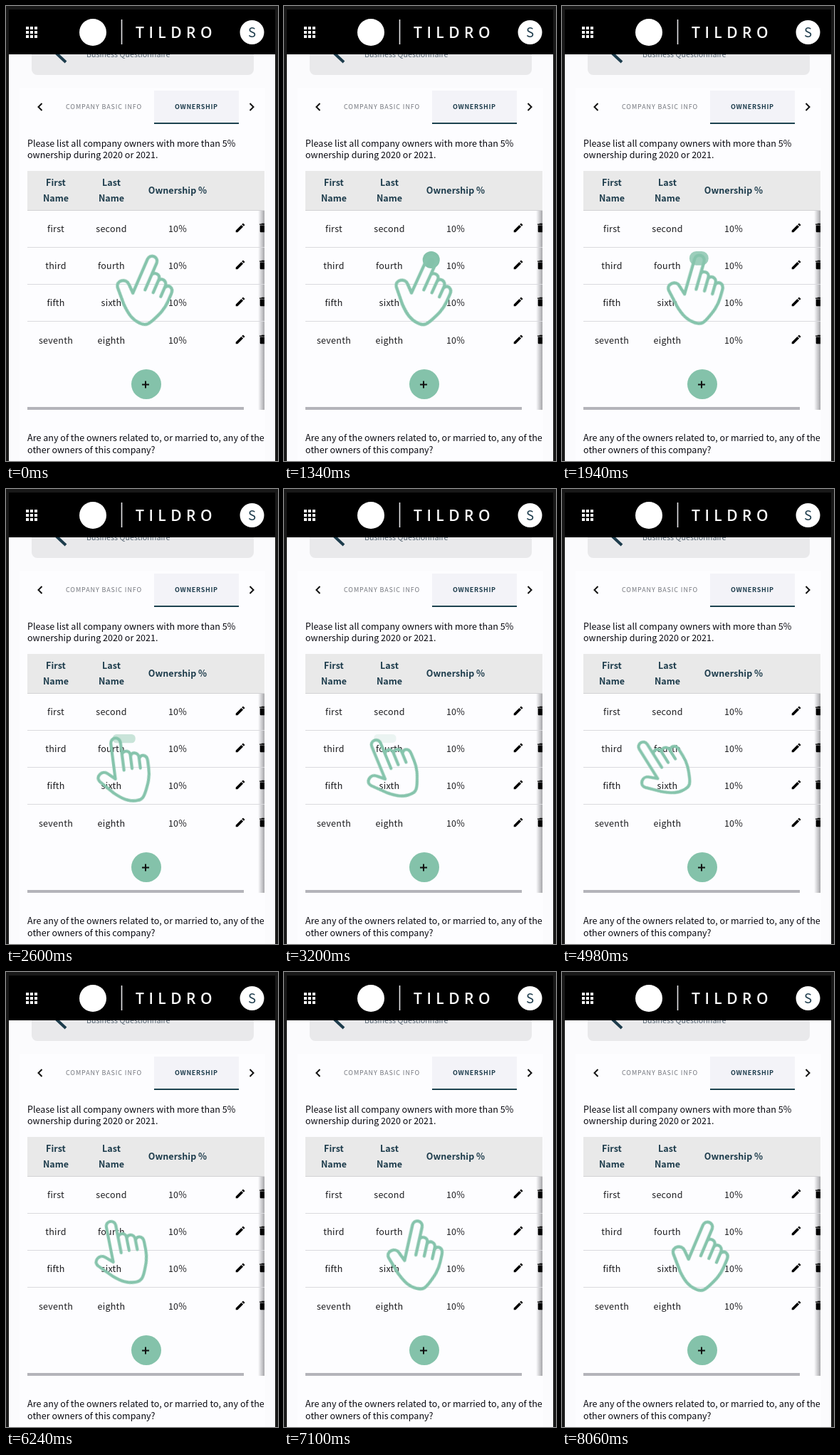
These frames come from a looping animation (382x640 px, 8.16 s). An HTML page:

```html
<!DOCTYPE html>
<html lang="en">
<head>
<meta charset="utf-8">
<title>Owner table swipe hint</title>
<style>
  html, body { margin: 0; width: 100%; height: 100%; overflow: hidden; background: #fcfcfe; }
  svg { display: block; width: 382px; height: 640px; }
  text { font: 12.53px "Noto Sans CJK JP", "Noto Sans CJK SC", "Noto Sans CJK", "Open Sans", sans-serif; fill: #08080f; letter-spacing: .03px; }
  .mid { text-anchor: middle; }
  .cell { letter-spacing: .25px; fill: #1c1c1f; }
  .head { font-weight: 700; fill: #1d3c4c; }
  .tab { font-size: 9px; letter-spacing: .88px; fill: #72757c; }
  .tab.on { font-weight: 700; letter-spacing: .65px; fill: #1d3c4c; }
  .brand { font: 600 21px "Open Sans", sans-serif; letter-spacing: 6.5px; fill: #fff; }
  .line { fill: none; stroke: #111; stroke-width: 2; }

  #hand {
    fill: none; stroke: #86c4ac; stroke-width: 4.4; stroke-linecap: round; stroke-linejoin: round;
    animation: swipe 8160ms -7560ms infinite;
  }
  #touch { fill: #84c2aa; opacity: 0; animation: touch 8160ms linear infinite; }

  @keyframes swipe {
    0%, 7.97% {
      transform: translate(193px, 390px) rotate(24.5deg);
      animation-timing-function: cubic-bezier(.33, 0, .3, 1);
    }
    49.02%, 55.15% {
      transform: translate(131px, 389.5px) rotate(-32deg) scale(.94);
      animation-timing-function: cubic-bezier(.33, 0, .3, 1);
    }
    100% { transform: translate(193px, 390px) rotate(24.5deg); }
  }
  @keyframes touch {
    0%, 8.58% { x: 207px; y: 357px; width: 0; height: 0; rx: 0; opacity: 0; fill: #84c2aa; }
    14.1% { x: 195px; y: 345px; width: 24px; height: 24px; rx: 12px; opacity: 1; fill: #84c2aa; }
    15.32% {
      x: 195px; y: 345px; width: 24px; height: 24px; rx: 12px; opacity: 1; fill: #84c2aa;
      animation-timing-function: cubic-bezier(.4, 0, .7, .8);
    }
    31.86% {
      x: 149px; y: 345px; width: 32px; height: 12px; rx: 5px; opacity: 1; fill: #cae5da;
      animation-timing-function: cubic-bezier(.2, .5, .5, 1);
    }
    47.79% { x: 119px; y: 345px; width: 31px; height: 12px; rx: 5px; opacity: .12; fill: #cae5da; }
    55.15%, 100% { x: 114px; y: 345px; width: 30px; height: 12px; rx: 5px; opacity: 0; fill: #cae5da; }
  }
</style>
</head>
<body>
<svg viewBox="0 0 382 640">
  <defs>
    <linearGradient id="shade">
      <stop offset="0" stop-color="#808084" stop-opacity="0"/>
      <stop offset="1" stop-color="#808084" stop-opacity=".7"/>
    </linearGradient>
    <clipPath id="table"><path d="M30 232H363V568H30z"/></clipPath>
    <path id="pencil" transform="scale(.7)" d="M3 17.25V21h3.75L17.81 9.94l-3.75-3.75zM20.71 7.04c.39-.39.39-1.02 0-1.41l-2.34-2.34c-.39-.39-1.02-.39-1.41 0l-1.83 1.83 3.75 3.75z"/>
    <path id="bin" transform="scale(.7)" d="M6 19c0 1.1.9 2 2 2h8c1.1 0 2-.9 2-2V7H6zM19 4h-3.5l-1-1h-5l-1 1H5v2h14z"/>
  </defs>

  <rect width="382" height="640" fill="#fbfbfd"/>
  <rect x="19" y="115" width="345" height="525" fill="#fdfdff"/>

  <!-- back link, cut off by the header -->
  <rect x="36" y="50" width="312" height="47" rx="8" fill="#e9e9eb"/>
  <path d="M84 79L69 65L84 51M69 65H97" fill="none" stroke="#1d3c4c" stroke-width="4"/>
  <text x="113" y="72" style="font-size:10.700px;fill:#566572">Business Questionnaire</text>

  <!-- header -->
  <path d="M0 0H382V640H378V68H4V640H0z" fill="#191919"/>
  <rect x="4" y="5" width="374" height="63"/>
  <g id="dots" fill="#fff"></g>
  <circle cx="122" cy="37" r="19" fill="#fff"/>
  <path d="M162.500 19V54" stroke="#e4e4e6" stroke-width="1.6"/>
  <text class="brand" x="182" y="45">TILDRO</text>
  <circle cx="345.500" cy="37" r="17" fill="#fff"/>
  <text class="mid" x="345.500" y="44" style="font-size:18.500px;fill:#1d3c4c">S</text>

  <!-- tabs -->
  <rect x="208" y="119" width="119" height="46" fill="#f3f3f8"/>
  <path d="M208 165H327" stroke="#1d4350" stroke-width="2"/>
  <path class="line" d="M50.500 137L45.500 142L50.500 147M342.500 137L347.500 142L342.500 147"/>
  <text class="tab" x="84" y="145">COMPANY BASIC INFO</text>
  <text class="tab on" x="237" y="145">OWNERSHIP</text>

  <text x="30" y="198">Please list all company owners with more than 5%</text>
  <text x="30" y="214">ownership during 2020 or 2021.</text>

  <!-- owner table -->
  <g clip-path="url(#table)">
    <rect x="30" y="232" width="333" height="55" fill="#e9e9e9"/>
    <path d="M30 287.500H363" stroke="#d2d2d4"/>
    <text class="mid head" x="70" y="253">First</text>
    <text class="mid head" x="70" y="275">Name</text>
    <text class="mid head" x="148" y="253">Last</text>
    <text class="mid head" x="148" y="275">Name</text>
    <text class="mid head" x="241" y="264">Ownership %</text>
    <rect x="354" y="288" width="9" height="280" fill="url(#shade)"/>
    <g id="rows"></g>
    <rect x="30" y="564" width="304" height="4" fill="#b4b4ba"/>
  </g>
  <circle cx="197" cy="532" r="21" fill="#84c2aa"/>
  <path class="line" d="M191 532.500H201M196 527.500V537.500" stroke-width="1.8"/>

  <text x="30" y="612">Are any of the owners related to, or married to, any of the</text>
  <text x="30" y="629">other owners of this company?</text>

  <rect id="touch"/>
  <g id="hand">
    <path transform="translate(0 -34)" d="M-7 52V0A7 7 0 0 1 7 0V41M7 19C7 12 19 12 19 20V40M19 23C20 15 31 17 31 25V41M31 28C33 20 43 22 43 32V43C43 56 39 65 35 74C31 83 28 87 21 87C8 88 -2 81 -12 72L-30 53C-36 45 -24 36 -17 43L-7 52"/>
  </g>
</svg>
<script>
  const byId = id => document.getElementById(id);

  byId('dots').innerHTML = [0, 1, 2].flatMap(row => [0, 1, 2].map(col =>
    `<rect x="${28 + col * 6}" y="${29 + row * 6}" width="4" height="4"/>`)).join('');

  const owners = [['first', 'second'], ['third', 'fourth'], ['fifth', 'sixth'], ['seventh', 'eighth']];
  const cell = (x, y, text) => `<text class="mid cell" x="${x}" y="${y}">${text}</text>`;
  byId('rows').innerHTML = owners.map(([first, last], i) => {
    const y = Math.round(313 + i * 52.2);
    const rule = i < 3 ? `<path d="M30 ${y + 26.5}H363" stroke="#dadade"/>` : '';
    return cell(70, y + 5, first) + cell(148, y + 5, last) + cell(241, y + 5, '10%') +
      `<use href="#pencil" x="320.600" y="${y - 9.4}"/><use href="#bin" x="352.500" y="${y - 9.4}"/>` + rule;
  }).join('');

  // Motion advances in short steps and rests for 100 ms in every 840 ms.
  const LOOP = 8160, BEAT = 840, STEP = 740 / 17;
  const motions = document.getAnimations();
  motions.forEach(m => m.pause());

  function draw() {
    const t = performance.now() % LOOP;
    const part = (t - 80 + LOOP) % BEAT;
    const held = t < 80 ? t : t - part + Math.min(17, Math.floor(part / STEP)) * STEP;
    const shown = Math.min(held, 8060);
    motions.forEach(m => { m.currentTime = shown; });
    requestAnimationFrame(draw);
  }
  draw();
</script>
</body>
</html>
```
